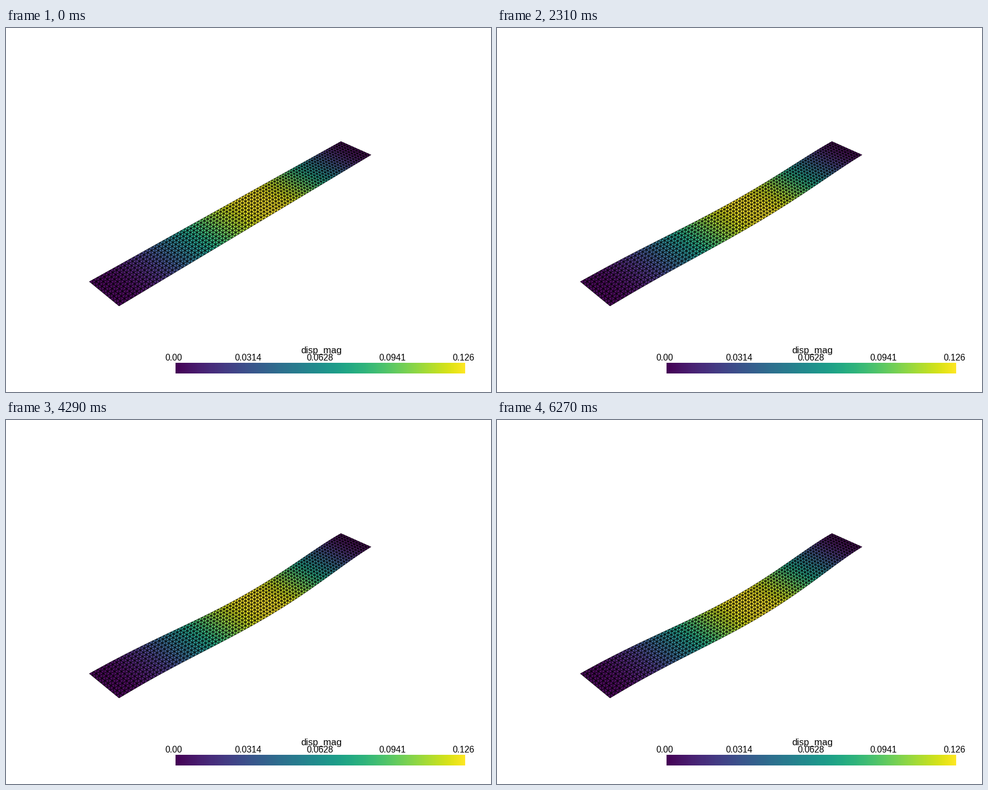
A matplotlib script that plays this animation: 864 px wide and 648 px high, repeating every 6600 ms.

```python
import numpy as np
import matplotlib.pyplot as plt
from matplotlib.animation import FuncAnimation
from matplotlib.collections import LineCollection, PolyCollection
from matplotlib.path import Path

W, H, DPI = 864, 648, 100
FRAMES, STEP = 20, 330
LENGTH, WIDTH = 8.0, 1.0
NX, NY = 80, 10
SAG = 0.252
NEAR, FAR = 2.4, 2.0  # stiffness exponents of the two clamped ends
CMAP = plt.get_cmap("viridis")

# Isometric perspective camera fitted to the flat strip
HALF_ANGLE = np.radians(15)
FOCAL = H / 2 / np.tan(HALF_ANGLE)
DIST = np.hypot(LENGTH, WIDTH) / 2 / np.sin(HALF_ANGLE)


def project(x, y, z):
    right = (y - x) / np.sqrt(2)
    up = (2 * z - x - y) / np.sqrt(6)
    depth = DIST - (x + y + z) / np.sqrt(3)
    return np.stack([W / 2 + FOCAL * right / depth,
                     H / 2 - FOCAL * up / depth], axis=-1)


def shape(x):
    """Deflection of the strip between its clamped ends, peak 1."""
    def curve(s):
        return s**NEAR * (1 - s)**FAR
    return curve(0.5 - x / LENGTH) / curve(NEAR / (NEAR + FAR))


def grid(nx, ny, amp):
    x, y = np.meshgrid(np.linspace(-LENGTH / 2, LENGTH / 2, nx + 1),
                       np.linspace(-WIDTH / 2, WIDTH / 2, ny + 1),
                       indexing="ij")
    return project(x, y, -amp * shape(x))


def bands(amp):
    p = grid(4 * NX, 1, amp)
    return np.stack([p[:-1, 0], p[1:, 0], p[1:, 1], p[:-1, 1]], axis=1)


def edges(amp):
    p = grid(NX, NY, amp)
    diagonals = np.stack([p[:-1, :-1], p[1:, 1:]], axis=2).reshape(-1, 2, 2)
    return list(p) + list(p.swapaxes(0, 1)) + list(diagonals)


def outline(amp):
    p = grid(NX, 1, amp)
    return Path(np.vstack([p[:, 0], p[::-1, 1], p[:1, 0]]), closed=True)


fig = plt.figure(figsize=(W / DPI, H / DPI), dpi=DPI, facecolor="white")
ax = fig.add_axes([0, 0, 1, 1])
ax.axis("off")

mid = (np.arange(4 * NX) + 0.5) / (4 * NX) * LENGTH - LENGTH / 2
fill_colors = CMAP(shape(mid))
fill = PolyCollection(bands(0), facecolors=fill_colors,
                      edgecolors=fill_colors, linewidths=0.2)
mesh = LineCollection(edges(0), colors="black", linewidths=0.72,
                      capstyle="butt")
ax.add_collection(fill)
ax.add_collection(mesh)

# Scalar bar
ax.imshow(np.arange(256)[None, :], cmap=CMAP, extent=(302, 818, 615, 596),
          aspect="auto", interpolation="nearest")


def label(x, y, text, px):
    ax.text(x, y, text, ha="center", va="baseline", color="black",
            family="Liberation Sans", fontsize=px * 72 / DPI)


label(561.5, 579, "disp_mag", 16.8)
for x, text in zip((298.5, 431.5, 559.5, 688.5, 814.5),
                   ("0.00", "0.0314", "0.0628", "0.0941", "0.126")):
    label(x, 591.5, text, 15.6)

ax.set_xlim(0, W)
ax.set_ylim(H, 0)


def draw(i):
    amp = SAG * np.sin(np.pi / 2 * i / (FRAMES - 1))
    fill.set_verts(bands(amp))
    mesh.set_segments(edges(amp))
    for part in (fill, mesh):
        part.set_clip_path(outline(amp), ax.transData)
    return fill, mesh


anim = FuncAnimation(fig, draw, frames=FRAMES, interval=STEP,
                     repeat=True, repeat_delay=0)
plt.show()
```
